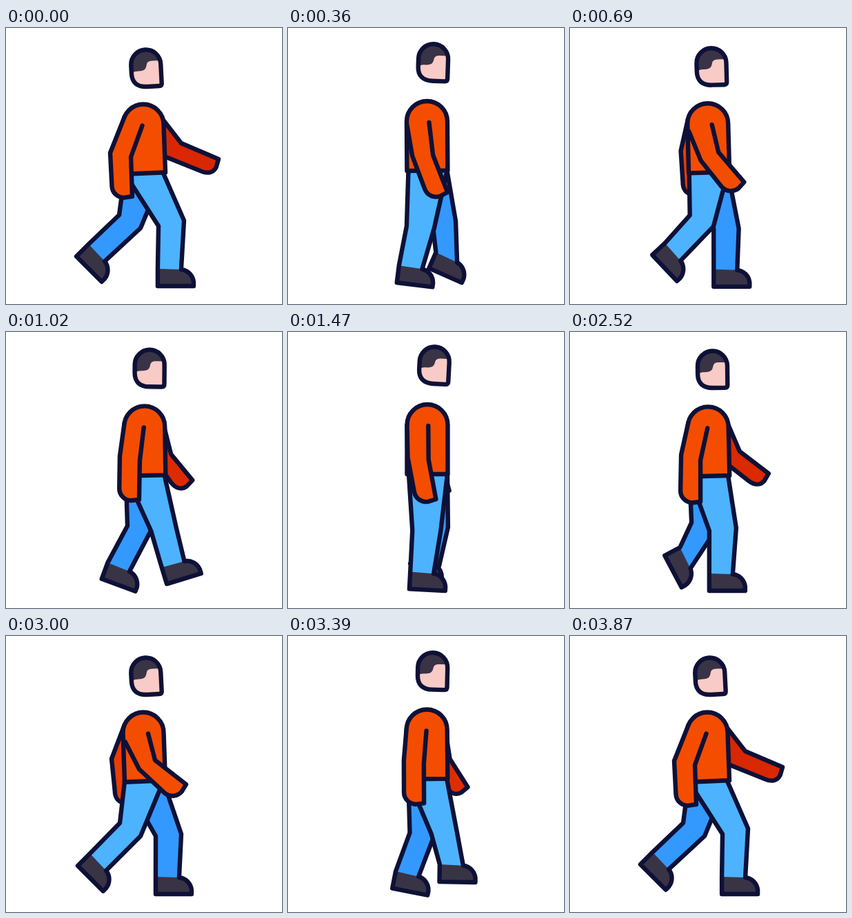
Animation of 400x400 px, one loop 3.9 s. Source, as an HTML page:

```html
<!DOCTYPE html>
<html lang="en">
<head>
<meta charset="utf-8">
<title>Walk cycle</title>
<style>
  html, body { margin: 0; width: 100%; height: 100%; overflow: hidden; background: #fff; }
  svg { display: block; width: 100%; height: 100%; }
  .line { fill: none; stroke: #0e1137; stroke-width: 6.4; stroke-linejoin: round; stroke-linecap: round; }
  .near { fill: #4db3ff; }
  .far { fill: #3399ff; }
  .shoe, .hair { fill: #393346; }
  .shirt { fill: #f44d00; }
  .skin { fill: #f9cbc6; }
</style>
</head>
<body>
<svg viewBox="0 0 400 400">
  <g id="farArm"><path class="sleeve"/><path class="line"/></g>
  <g id="farLeg"><path class="far"/><path class="shoe"/><path class="line"/></g>
  <g id="nearLeg"><path class="near"/><path class="shoe"/><path class="line"/></g>
  <g id="torso"><path class="shirt"/><path class="line"/></g>
  <g id="nearArm"><path class="shirt"/><path class="line"/></g>
  <g id="head">
    <path class="skin" d="M-21.5-5A21.5 21.5 0 0 1 21.5-5V23Q21.5 27 17.5 27H0C-14 27-21.5 20-21.5 7Z"/>
    <path class="hair" d="M-21.5-5A21.5 21.5 0 0 1 21.5-5V-10H9Q2-10 1-5C0 1-2 4-11 4C-17 4-20 5-21.5 8Z"/>
    <path class="line" d="M-21.5-5A21.5 21.5 0 0 1 21.5-5V23Q21.5 27 17.5 27H0C-14 27-21.5 20-21.5 7Z"/>
  </g>
</svg>
<script>
const LOOP = 3900, STRIDE = 1200, SLOW_AT = 3300;

// phase, back of knee x y, front of knee x y, heel x y, foot angle
const nearLegKeys = [
  [0, 221, 287, 258, 279, 220, 374, 0],
  [.1, 202, 288, 241, 284, 202, 375, 0],
  [.3, 172, 287, 212, 290, 158, 369, 7],
  [.35, 170, 283, 208, 291, 142, 360, 19],
  [.5, 165, 271, 195, 290, 104, 333, 45],
  [.625, 182, 272, 219, 286, 136, 328, 47],
  [.8, 206, 286, 243, 283, 207, 350, 14],
  [.85, 210, 288, 247, 285, 233, 365, -17]
];
const farLegKeys = [
  [0, 217, 290, 254, 287, 217, 374, 0],
  [.125, 200, 291, 236, 292, 201, 375, 0],
  [.3, 177, 287, 213, 291, 159, 369, 7],
  [.35, 176, 281, 209, 290, 139, 358, 20],
  [.5, 164, 271, 195, 290, 102, 331, 45],
  [.6, 176, 276, 209, 290, 137, 324, 62],
  [.8, 210, 288, 243, 280, 204, 348, 24],
  [.85, 212, 288, 247, 283, 230, 363, -12]
];
// phase, front of elbow x y, hand tip x y, back of elbow x y, shoulder seam shift
const nearArmKeys = [
  [0, 181, 187, 183, 244, 151, 181, -1.5],
  [.1, 189, 186, 189, 246, 161, 178, -1],
  [.3, 210, 184, 231, 238, 180, 185, 3],
  [.5, 216, 180, 261, 215, 193, 193, 7],
  [.625, 214, 180, 243, 230, 186, 191, 5],
  [.85, 194, 186, 193, 243, 165, 180, -1]
];
const farArmKeys = [
  [0, 254, 167, 308, 190, 232, 187, 24],
  [.1, 246, 173, 288, 205, 226, 190, 25],
  [.3, 205, 184, 208, 238, 177, 182, 20],
  [.5, 183, 184, 184, 240, 153, 178, 18],
  [.625, 198, 184, 196, 239, 169, 178, 18],
  [.85, 239, 177, 270, 215, 219, 190, 25]
];

const $ = id => document.getElementById(id);
const frac = x => x - Math.floor(x);
const pt = (x, y) => x.toFixed(2) + ' ' + y.toFixed(2);

// Periodic smooth interpolation that never overshoots its keys
function sample(keys, p) {
  const n = keys.length;
  const key = j => keys[(j + n) % n];
  const time = j => key(j)[0] + Math.floor(j / n);
  let i = n - 1;
  while (keys[i][0] > p) i--;
  const h = time(i + 1) - time(i), u = (p - time(i)) / h;
  return key(i).slice(1).map((a, k) => {
    const slope = j => (key(j + 1)[k + 1] - key(j)[k + 1]) / (time(j + 1) - time(j));
    const tangent = (s, t) => s * t > 0 ? 2 * s * t / (s + t) : 0;
    const m0 = tangent(slope(i - 1), slope(i)), m1 = tangent(slope(i), slope(i + 1));
    const b = key(i + 1)[k + 1], v = 1 - u;
    return a * (1 + 2 * u) * v * v + b * u * u * (3 - 2 * u) + h * u * v * (m0 * v - m1 * u);
  });
}

function draw(id, ...paths) {
  const parts = $(id).children;
  paths.forEach((d, i) => parts[i].setAttribute('d', d));
}

function drawLeg(id, keys, p, body) {
  const [bx, by, fx, fy, hx, hy, deg] = sample(keys, p);
  const c = Math.cos(deg * Math.PI / 180), s = Math.sin(deg * Math.PI / 180);
  const at = (x, y) => pt(hx + x * c - y * s, hy + x * s + y * c);
  const foot = `${at(0, -25)}L${at(0, 0)}L${at(52, 0)}L${at(52, -6)}C${at(51, -15)} ${at(44, -23)} ${at(34, -24)}`;
  const leg = `M${pt(body.x - 27, body.waist)}L${pt(bx, by)}L${foot}L${pt(fx, fy)}L${pt(body.x + 29, body.waist)}`;
  draw(id, leg + 'Z', `M${foot}Z`, leg);
}

function drawArm(id, keys, p, body, width, lift) {
  const [ex, ey, hx, hy, ox, oy, shift] = sample(keys, p);
  const len = Math.hypot(hx - ex, hy - ey), ux = (hx - ex) / len, uy = (hy - ey) / len;
  const hand = (across, along) => pt(hx - uy * across + ux * along, hy + ux * across + uy * along);
  // Outer edge leaves the round shoulder along its tangent
  const dx = ox - body.x, dy = oy - body.y;
  const a = Math.atan2(dy, dx) + Math.acos(Math.min(1, body.r / Math.hypot(dx, dy)));
  const d = `M${pt(body.x + shift, body.y + lift)}L${pt(ex, ey)}L${pt(hx, hy)}L${hand(12, 1.5)}` +
    `C${hand(21, 1)} ${hand(width, -6)} ${hand(width, -16)}L${pt(ox, oy)}` +
    `L${pt(body.x + body.r * Math.cos(a), body.y + body.r * Math.sin(a))}`;
  draw(id, d + 'Z', d);
}

function drawTorso(b, lean) {
  const d = `M${pt(b.x - b.r + lean, b.waist + lean / 2)}L${pt(b.x - b.r, b.y)}` +
    `A${b.r} ${b.r} 0 0 1 ${pt(b.x + b.r, b.y)}L${pt(b.x + b.r + lean, b.waist - lean / 2)}Z`;
  draw('torso', d, d);
}

// Steady walk, easing to rest over the last half second
function phaseAt(t) {
  if (t < SLOW_AT) return frac(t / STRIDE);
  const left = (LOOP - t) / (LOOP - SLOW_AT);
  return frac(3 - .25 * left * left);
}

function render(t) {
  const p = phaseAt(t), q = frac(2 * p);
  const rise = Math.sin(Math.PI * (q + .04 * Math.sin(Math.PI * q) ** 2)) ** 2;
  const body = { x: 199 + 3 * rise, y: 140 - 5.5 * rise, r: 29.5, waist: 210.5 - 4.5 * rise };
  const swing = Math.cos(2 * Math.PI * p);

  $('farArm').firstElementChild.setAttribute('fill', `rgb(${226 - 9 * swing},${50 - 11 * swing},0)`);
  drawArm('farArm', farArmKeys, p, body, 26, -13);
  drawLeg('farLeg', farLegKeys, frac(p + .5), body);
  drawLeg('nearLeg', nearLegKeys, p, body);
  drawTorso(body, 2.5 * (1 - rise));
  drawArm('nearArm', nearArmKeys, p, body, 29, 1.5);
  $('head').setAttribute('transform',
    `translate(${pt(203 + 9 * rise, 58 - 10 * rise)}) rotate(${-3 + 6 * rise})`);
}

const start = performance.now();
function tick() {
  render((performance.now() - start) % LOOP);
  requestAnimationFrame(tick);
}
tick();
</script>
</body>
</html>
```
